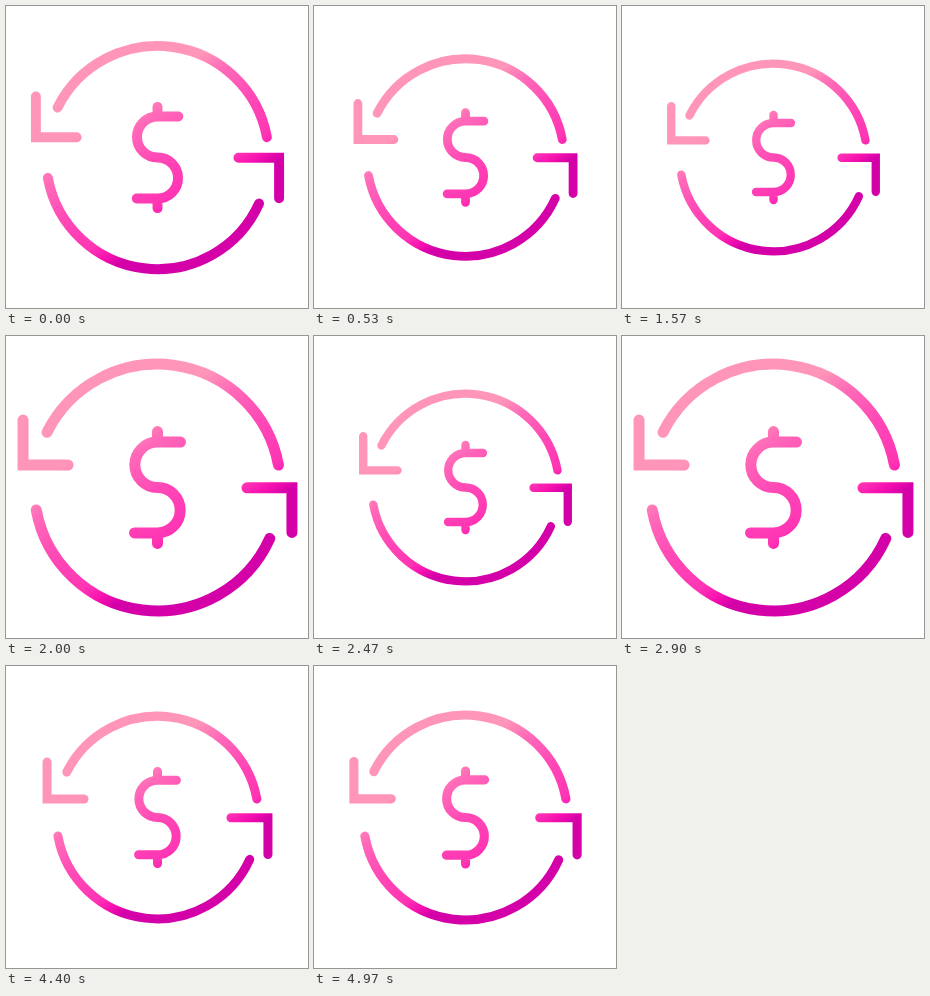
Write an HTML page that moves like this. It is 302x302 px and loops after 5010 ms.

```html
<!DOCTYPE html>
<html lang="en">
<head>
<meta charset="utf-8">
<title>Money cycle pulse</title>
<style>
  html, body { margin: 0; width: 100%; height: 100%; overflow: hidden; background: #fff; }
  svg { display: block; width: 100vw; height: 100vh; }
</style>
</head>
<body>
<svg viewBox="0 0 302 302">
  <defs>
    <linearGradient id="pink" gradientUnits="userSpaceOnUse" x1="-38.5" y1="-58.5" x2="41" y2="62.6">
      <stop offset="0" stop-color="#ff96b9"/>
      <stop offset=".2" stop-color="#ff6ab8"/>
      <stop offset=".48" stop-color="#ff4ab6"/>
      <stop offset=".79" stop-color="#ff35b4"/>
      <stop offset=".9" stop-color="#f812b0"/>
      <stop offset="1" stop-color="#d400a8"/>
    </linearGradient>
  </defs>
  <g id="icon" fill="none" stroke="url(#pink)" stroke-width="11" stroke-linecap="round">
    <!-- ring -->
    <path d="M-110.5-55.3A123.3 123.3 0 0 1 121-22.5M-121.3 22.5A123.3 123.3 0 0 0 112.3 51"/>
    <!-- arrow corners -->
    <path d="M-134.5-67.5V-22.5H-89.5M89.5 .3H134.5V45"/>
    <!-- dollar sign -->
    <path d="M23-45.4H0A22.7 22.7 0 0 0 0 0A22.7 22.7 0 0 1 0 45.4H-23M0-56V-45.4M0 45.4V56"/>
  </g>
</svg>
<script>
  const LOOP = 5010, FRAME = 100 / 3, LAST = 149;
  const BEAT = 27, FALL = 16.7, RISE = BEAT - FALL, PEAK = 25.5 - 21;
  const LOW = 0.735, SWING = 0.275, UNIT = 0.972;
  const icon = document.getElementById("icon");

  // Each beat drops quickly from its peak, slows down, then climbs almost linearly.
  function pulse(frame) {
    const q = (frame - PEAK + BEAT) % BEAT;
    const level = q < FALL
      ? Math.pow(1 - q / FALL, 1.6)
      : Math.pow((q - FALL) / RISE, 1.13);
    return (LOW + SWING * level) / UNIT;
  }

  function draw(now) {
    const frame = Math.min(LAST, Math.floor((now % LOOP + 5) / FRAME));
    icon.setAttribute("transform", `translate(151.5 151.5) scale(${pulse(frame)})`);
    requestAnimationFrame(draw);
  }

  draw(0);
</script>
</body>
</html>
```
